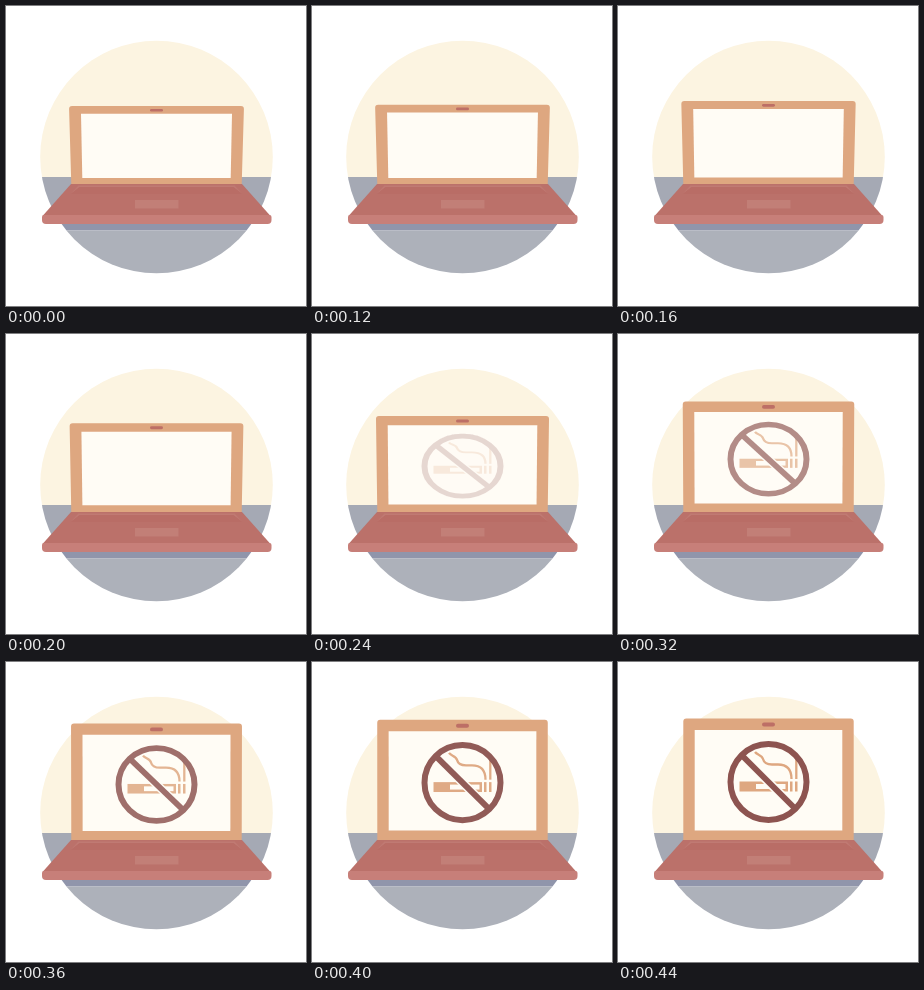
These frames come from a looping animation (300 px wide and 300 px high, 2000 ms). An HTML page with a canvas:

```html
<!DOCTYPE html>
<html lang="en">
<head>
<meta charset="utf-8">
<title>Laptop opening</title>
<style>
html, body { margin: 0; width: 100%; height: 100%; overflow: hidden; background: #fff; }
canvas { display: block; width: 300px; height: 300px; }
</style>
</head>
<body>
<canvas id="stage"></canvas>
<script>
const canvas = document.getElementById('stage');
const ctx = canvas.getContext('2d');
const dpr = window.devicePixelRatio || 1;
canvas.width = canvas.height = 300 * dpr;

const LOOP = 2000, START = 80, STEP = 40, STEPS = 9;
const HINGE = 178, LID = 121.5;
const TAN = '#dea780', ROSE = '#bb716a', WINE = '#8d5450', PAPER = '#fffcf5';

const mix = (a, b, p) => a + (b - a) * p;

function rect(color, x, y, w, h) {
  ctx.fillStyle = color;
  ctx.fillRect(x, y, w, h);
}

function round(color, x, y, w, h, r) {
  ctx.fillStyle = color;
  ctx.beginPath();
  ctx.roundRect(x, y, w, h, r);
  ctx.fill();
}

// Symmetric trapezoid around x = 150.5, with optional rounded top corners
function trapezoid(color, top, bottom, halfTop, halfBottom, r = 0) {
  const c = 150.5;
  ctx.fillStyle = color;
  ctx.beginPath();
  ctx.moveTo(c - halfBottom, bottom);
  ctx.arcTo(c - halfTop, top, c + halfTop, top, r);
  ctx.arcTo(c + halfTop, top, c + halfBottom, bottom, r);
  ctx.lineTo(c + halfBottom, bottom);
  ctx.fill();
}

function stroke(color, width, path) {
  ctx.strokeStyle = color;
  ctx.lineWidth = width;
  ctx.stroke(new Path2D(path));
}

function drawRoom() {
  ctx.save();
  ctx.beginPath();
  ctx.arc(150.5, 151, 116.3, 0, Math.PI * 2);
  ctx.clip();
  rect('#fcf4e1', 30, 30, 240, 141);
  rect('#a5a9b4', 30, 171, 240, 47);
  rect('#9095ab', 30, 218, 240, 6.5);
  rect('#adb1ba', 30, 224.5, 240, 46);
  ctx.restore();
}

function drawSign() {
  // cigarette
  rect(TAN, 121.5, 119.5, 48.5, 10);
  rect(PAPER, 138, 122, 29.5, 5);
  rect(TAN, 172, 119.5, 2.5, 10);
  rect(TAN, 177, 119.5, 2.5, 10);
  // smoke
  stroke(TAN, 2.3, 'M137 90 C139 93 144 93 145 97 C146 101 149 102.5 154 102.5 H160 C169 102.5 173.5 107 173.5 117');
  stroke(TAN, 2.3, 'M178.3 94 V117');
  // ban ring
  stroke(PAPER, 9, 'M124 93.5 L177 146.5');
  stroke(WINE, 6, 'M123 92.5 L178 147.5');
  ctx.strokeStyle = WINE;
  ctx.lineWidth = 6;
  ctx.beginPath();
  ctx.arc(150.5, 120, 38, 0, Math.PI * 2);
  ctx.stroke();
}

function drawLid(p) {
  const top = mix(100, 56.5, p);
  trapezoid(TAN, top, HINGE + 1, mix(87.5, 85.2, p), 85.2, 3);
  trapezoid(PAPER, top + mix(7.7, 11.5, p), mix(172, 168.5, p),
            mix(75.5, 73.8, p), mix(74.2, 73.8, p));
  const h = mix(2.6, 4, p);
  round('#bd6f66', 144, top + mix(4.2, 6, p) - h / 2, 13, h, h / 2);

  // the sign fades in once the lid is partly raised
  const alpha = (p - 0.25) / 0.75;
  if (alpha <= 0.001) return;
  const layer = new Path2D();
  layer.rect(60, 50, 180, 125);
  ctx.save();
  ctx.clip(layer);
  ctx.translate(0, HINGE);
  ctx.scale(1, (HINGE - top) / LID);
  ctx.translate(0, -HINGE);
  ctx.globalAlpha = 1;
  drawSign();
  // veil of screen colour keeps overlapping strokes even
  ctx.globalAlpha = 1 - alpha;
  ctx.fillStyle = PAPER;
  ctx.beginPath();
  ctx.arc(150.5, 120, 42, 0, Math.PI * 2);
  ctx.fill();
  ctx.restore();
}

function drawBase() {
  trapezoid(ROSE, HINGE, 210, 85.5, 114);
  trapezoid('#c07a73', HINGE + 1.5, 188, 78, 86);
  trapezoid('#b96d66', HINGE + 3, 188, 77, 86);
  rect('#c27f77', 129, 194, 43.5, 8.5);
  round('#c77f79', 36, 209, 229.5, 9, [2, 2, 4, 4]);
}

function frame(now) {
  const t = now % LOOP;
  const n = Math.max(0, Math.min(STEPS, Math.floor((t - START) / STEP)));
  const p = (1 - Math.cos(Math.PI * n / STEPS)) / 2;
  ctx.setTransform(dpr, 0, 0, dpr, 0, 0);
  rect('#fff', 0, 0, 300, 300);
  drawRoom();
  drawLid(p);
  drawBase();
}

const began = performance.now();
function tick() {
  frame(performance.now() - began);
  requestAnimationFrame(tick);
}
tick();
</script>
</body>
</html>
```
